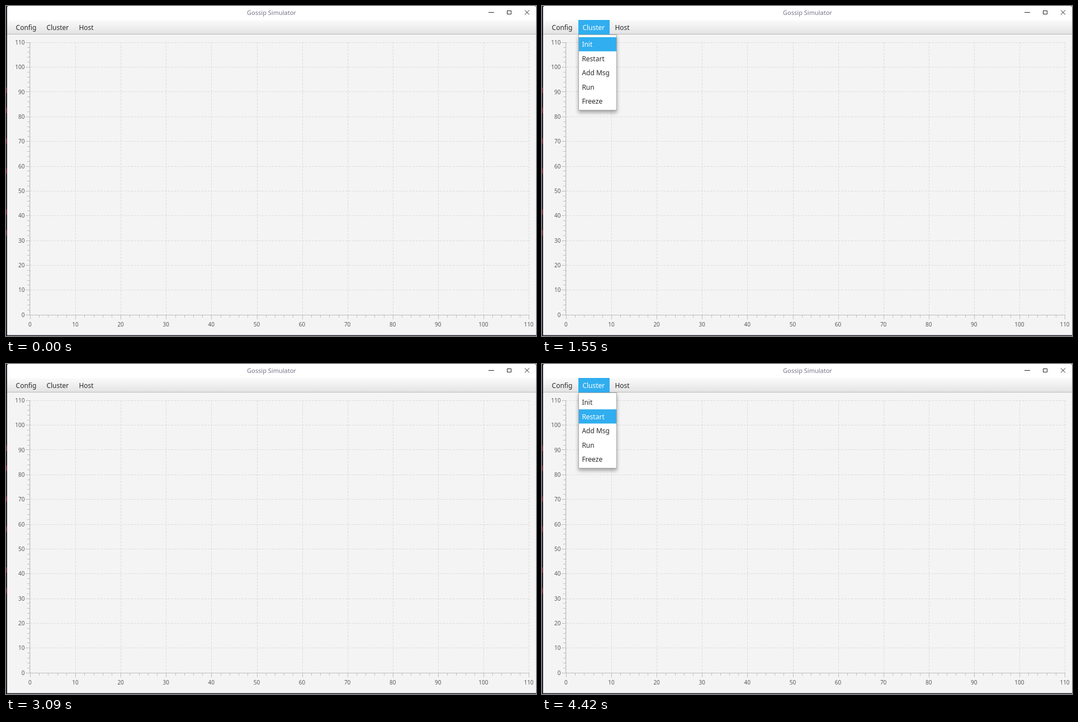
An HTML page that plays this animation: 948x591 px, repeating every 8000 ms.

```html
<!DOCTYPE html>
<html lang="en">
<head>
<meta charset="utf-8">
<title>Gossip Simulator</title>
<style>
  html, body { margin: 0; width: 100%; height: 100%; overflow: hidden; background: #f4f4f4; }
  svg { display: block; font: 12px "Noto Sans", "Open Sans", sans-serif; fill: #2b2b2b; }
  .title { font-size: 11px; fill: #77738a; text-anchor: middle; }
  .label { font-size: 10px; fill: #5a5a5a; }
  .line { fill: none; }
  .grid { stroke: #dcdcdc; stroke-dasharray: 4 2; }
  .axis { stroke: #bdbdbd; }
  .icon { stroke: #222; }
  .accent { fill: #30aeef; }
  .popup { filter: drop-shadow(0 4px 3px rgba(0, 0, 0, .33)); }
</style>
</head>
<body>
<svg id="stage" width="948" height="591" viewBox="0 0 948 591">
  <defs>
    <linearGradient id="bar" x2="0" y2="1">
      <stop stop-color="#fbfbfb"/>
      <stop offset="1" stop-color="#e3e3e3"/>
    </linearGradient>
  </defs>
</svg>
<script>
const LOOP = 8000, FADE_TICK = 50, FADE_TICKS = 7;
const stage = document.getElementById('stage');

function add(parent, tag, attrs, text = '') {
  const node = document.createElementNS(stage.namespaceURI, tag);
  for (const key in attrs) node.setAttribute(key, attrs[key]);
  node.textContent = text;
  return parent.appendChild(node);
}
const rect = (parent, x, y, width, height, attrs) =>
  add(parent, 'rect', { x, y, width, height, ...attrs });
const line = (d, name) => add(stage, 'path', { d, class: 'line ' + name });
const label = (parent, x, y, text, attrs) => add(parent, 'text', { x, y, ...attrs }, text);

function drawWindow() {
  rect(stage, 0, 0, 948, 591, { fill: '#231f2b' });
  for (const y of [151, 187, 242, 296, 369, 406])
    rect(stage, 0, y - 5, 1.5, 10, { fill: '#8c2f40' });
  add(stage, 'path', { d: 'M2 589.5V4Q2 0 5 0H945Q948 0 948 3V589.5Z', fill: '#f4f4f4' });
  add(stage, 'path', { d: 'M2 25V4Q2 0 5 0H945Q948 0 948 3V25Z', fill: '#fff' });
  label(stage, 475, 16, 'Gossip Simulator', { class: 'title' });
  line('M863 11.5h10M896.5 8.5h7v6h-7zM928 7.5l8 8M936 7.5l-8 8', 'icon');
  rect(stage, 2, 25, 946, 25, { fill: 'url(#bar)' });
  rect(stage, 2, 50, 946, 1, { fill: '#b9b9b9' });
}

function drawChart() {
  const snap = v => Math.floor(v) + .5;
  const posX = v => 43.52 + 8.11 * v;
  const posY = v => 553.2 - 4.436 * v;
  const left = 43, right = 936, top = 65, bottom = 553;
  let grid = '', axis = `M${left - .5} ${top}V${bottom + .5}H${right}`;
  for (let v = 0; v <= 110; v += 2) {
    const x = snap(posX(v)), y = snap(posY(v));
    const major = v % 10 === 0, size = major ? 8 : 5;
    axis += `M${left} ${y}h${-size}M${x} ${bottom}v${size}`;
    if (!major) continue;
    grid += `M${left} ${y}H${right}M${x} ${top}V${bottom}`;
    label(stage, 33.5, Math.round(posY(v) + 3.6), v, { class: 'label', 'text-anchor': 'end' });
    label(stage, posX(v) - .6, 574, v, { class: 'label', 'text-anchor': 'middle' });
  }
  line(grid, 'grid');
  line(axis, 'axis');
}

drawWindow();
drawChart();

const clusterBox = rect(stage, 65, 25, 56, 26, { class: 'accent' });
label(stage, 17.6, 43, 'Config');
const clusterText = label(stage, 72.4, 43, 'Cluster');
label(stage, 130.4, 43, 'Host');

const popup = add(stage, 'g', {});
rect(popup, 65.5, 51.5, 68, 135, { fill: '#fff', stroke: '#a8a8a8', class: 'popup' });
const itemBox = rect(popup, 66, 0, 67, 25.4, { class: 'accent' });
const items = ['Init', 'Restart', 'Add Msg', 'Run', 'Freeze']
  .map((name, i) => label(popup, 71.4, 73 + 25.5 * i, name));

// The popup fades in steeply, and out along the same curve reversed
function popupOpacity(t) {
  const ticksSince = time => Math.floor((t - time) / FADE_TICK);
  const closing = t >= 2720 && t < 3930;
  const ticks = closing ? FADE_TICKS - ticksSince(2720) : ticksSince(t < 2720 ? 970 : 3930) + 1;
  const p = Math.max(0, Math.min(1, ticks / FADE_TICKS));
  return 1 - (1 - p) ** 8;
}

function hoveredItem(t) {
  if (t < 3500) return t < 1220 ? -1 : t >= 1330 && t < 1550 ? 1 : 0;
  return t < 4240 ? -1 : t < 4420 ? 0 : 1;
}

function render(t) {
  const open = t >= 570 && t < 2770 || t >= 3560;
  clusterBox.style.opacity = open ? 1 : 0;
  clusterText.style.fill = open ? '#fff' : '';

  popup.style.opacity = popupOpacity(t);
  const hovered = hoveredItem(t);
  itemBox.style.opacity = hovered < 0 ? 0 : 1;
  itemBox.setAttribute('y', 55.8 + 25.4 * Math.max(0, hovered));
  items.forEach((item, i) => item.style.fill = i === hovered ? '#fff' : '');
}

const start = performance.now();
function tick() {
  render((performance.now() - start) % LOOP);
  requestAnimationFrame(tick);
}
tick();
</script>
</body>
</html>
```
